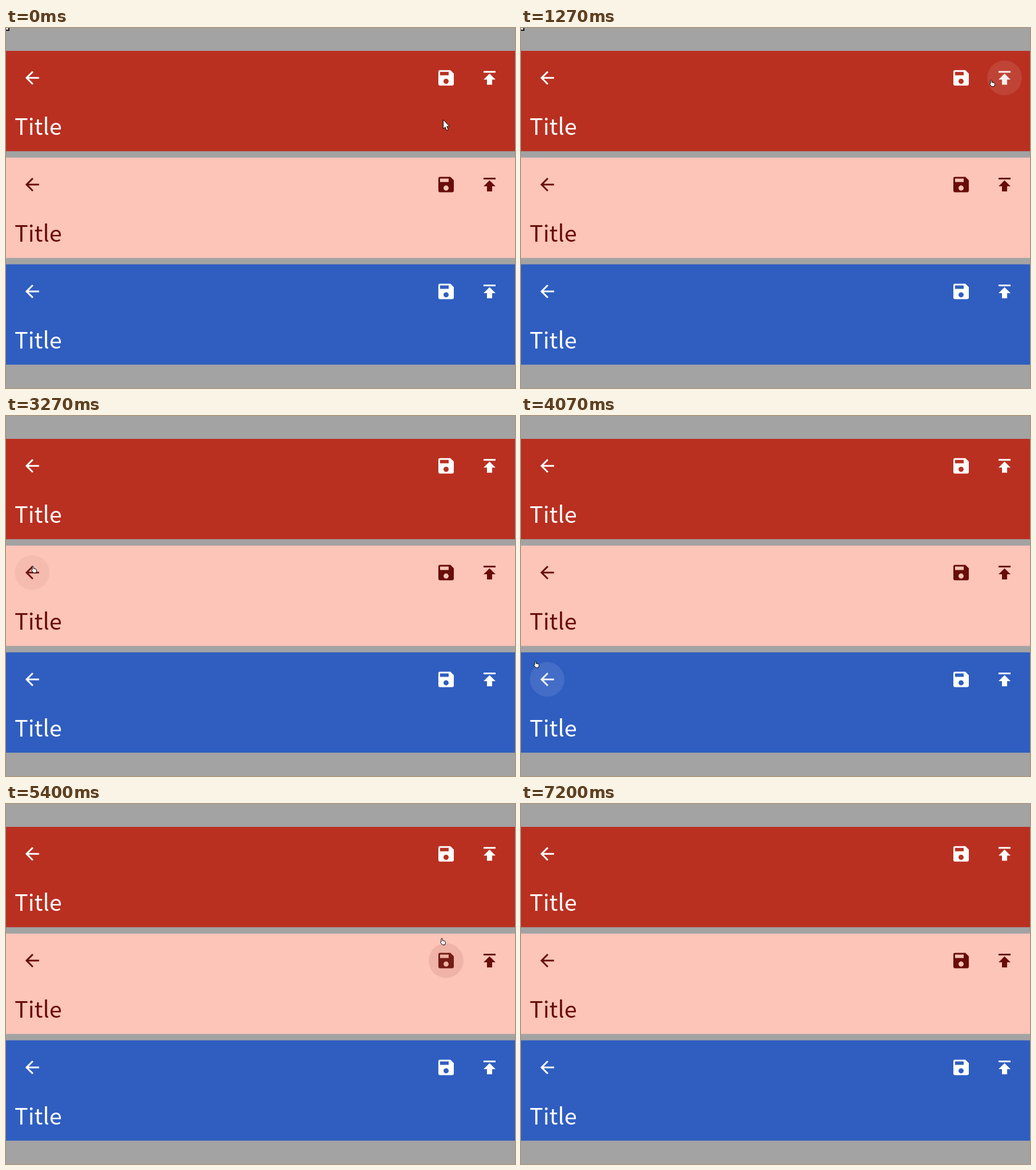
An HTML page that plays this animation: 890 by 630 pixels, repeating every 7940 ms.

```html
<!DOCTYPE html>
<html lang="en">
<head>
<meta charset="utf-8">
<title>App bars</title>
<style>
  html, body { margin: 0; width: 100%; height: 100%; overflow: hidden; background: #a3a3a4; }
  svg { display: block; }
  text { font: 39.5px "Noto Sans CJK JP", "Noto Sans CJK SC", "Noto Sans CJK", "Noto Sans", sans-serif; }
</style>
</head>
<body>
<svg id="stage" width="890" height="630" viewBox="0 0 890 630">
  <g id="bars"></g>
  <g id="corner">
    <path d="M0 0H6V5H0Z" fill="#111"/>
    <path d="M0 0H4V3H0Z" fill="#d4d4d4"/>
  </g>
  <g id="cursor" fill="#fff" stroke="#000" stroke-linejoin="round">
    <path id="arrow" d="M.5 .5V16.5L4 13.3L6.6 19.3L9.3 18.1L6.8 12.2H11.6Z"/>
    <path id="hand" d="M2 1.7Q3.1 0 4.2 1.7V5L8.3 6Q9.9 6.6 9.5 8.6L8.5 12.5H4L.8 8.5Q.4 6.8 2 7.2Z"/>
  </g>
</svg>
<script>
const LOOP = 7940, TICKS_PER_MS = 0.015;
const byId = id => document.getElementById(id);

function add(parent, tag, attrs, text = "") {
  const node = document.createElementNS("http://www.w3.org/2000/svg", tag);
  for (const name in attrs) node.setAttribute(name, attrs[name]);
  node.textContent = text;
  return parent.appendChild(node);
}

const icons = {
  back: { x: 45.8, d: "M20 11H7.83l5.59-5.59L12 4l-8 8 8 8 1.41-1.41L7.83 13H20v-2z" },
  save: { x: 769.5, d: "M17 3H5a2 2 0 0 0-2 2v14a2 2 0 0 0 2 2h14a2 2 0 0 0 2-2V7l-4-4z" +
    "M12 19a3 3 0 1 1 0-6 3 3 0 0 1 0 6zM15 9H5V5h10v4z" },
  upload: { x: 845.5, d: "M5 4v2h14V4H5zM5 14h4v6h6v-6h4l-7-7-7 7z" }
};
const themes = {
  red: { y: 40, back: "#b93021", ink: "#fff" },
  pink: { y: 226.8, back: "#fdc4b8", ink: "#680d08" },
  blue: { y: 413.6, back: "#2f5ec0", ink: "#fff" }
};

const buttons = {};
for (const [theme, { y, back, ink }] of Object.entries(themes)) {
  const bar = add(byId("bars"), "g", { transform: `translate(0 ${y})`, fill: ink });
  add(bar, "rect", { width: 890, height: 175.6, fill: back });
  add(bar, "text", { x: 15, y: 147.4 }, "Title");
  for (const [icon, { x, d }] of Object.entries(icons)) {
    const button = add(bar, "g", { transform: `translate(${x} 47.3)` });
    buttons[`${theme} ${icon}`] = {
      halo: add(button, "circle", { r: 30.3 }),
      glyph: add(button, "path", { d, "fill-rule": "evenodd", transform: "scale(1.5) translate(-12 -12)" })
    };
  }
}

// Button, first and last tick of its hover
const hovers = [
  ["red save", 3, 6], ["red upload", 5, 11], ["red save", 11, 14], ["red upload", 14, 22],
  ["red back", 31, 42], ["pink back", 49, 56], ["blue back", 58, 63],
  ["pink save", 79, 86], ["blue save", 87, 104]
];

// Each stroke lists tick, x, y and shape; the pointer rests between strokes
const strokes = [
  [[0, 764, 160], [1, 766, 193], [3, 772, 100, "hand"], [5, 800, 90, "hand"], [7, 842, 90, "hand"]],
  [[10, 830, 92, "hand"], [12, 774, 92, "hand"], [14, 790, 108], [16, 840, 95, "hand"]],
  [[19, 819, 90, "hand"], [20, 819, 90, "hand"], [22, 740, 110], [26, 214, 185], [27, 0, 0, "none"]],
  [[31, 42, 75, "hand"], [33, 29, 44.5, "hand"], [34, 29, 44.5, "hand"], [38, 45, 105, "hand"],
    [42, 44, 90, "hand"], [44, 42, 241]],
  [[49, 44, 262, "hand"], [54, 45, 310], [58, 45, 450, "hand"], [60, 40, 507], [61, 21.5, 428, "hand"], [62, 24, 415]],
  [[64, 100, 380], [72, 877, 254], [75, 838, 267], [77, 758, 234, "hand"]],
  [[79, 764, 250, "hand"], [81, 758.5, 234, "hand"], [84, 768, 280, "hand"], [86, 770, 360],
    [87, 770, 440, "hand"], [89, 780, 525], [90, 799, 463]],
  [[93, 812, 410], [97, 840, 238]],
  [[100, 830, 280], [102, 768, 433, "hand"]],
  [[105, 700, 510], [107, 253, 606], [108, 0, 0, "none"]]
];

function pointerAt(tick) {
  const stroke = strokes.filter(s => s[0][0] <= tick).pop();
  const i = stroke.findLastIndex(key => key[0] <= tick);
  const [start, x, y, shape = "arrow"] = stroke[i];
  const next = stroke[i + 1];
  const part = next ? (tick - start) / (next[0] - start) : 0;
  return { x: x + part * ((next?.[1] ?? x) - x), y: y + part * ((next?.[2] ?? y) - y), shape };
}

const clamp = v => Math.max(0, Math.min(1, v));

function render(time) {
  const tick = Math.floor((time % LOOP + 3.5) * TICKS_PER_MS);
  for (const name in buttons) {
    const level = Math.max(0, ...hovers.filter(h => h[0] === name)
      .map(([, on, off]) => clamp(Math.min((tick - on + 1) / 2, (off + 2 - tick) / 2))));
    buttons[name].halo.setAttribute("opacity", 0.095 * level);
    buttons[name].glyph.setAttribute("opacity", 1 - 0.09 * level);
  }
  const { x, y, shape } = pointerAt(tick);
  byId("cursor").setAttribute("transform", `translate(${Math.round(x)} ${Math.round(y)})`);
  for (const id of ["arrow", "hand"]) byId(id).style.display = id === shape ? "" : "none";
  byId("corner").style.display = tick < 47 ? "" : "none";
}

const begin = performance.now();
function loop() {
  render(performance.now() - begin);
  requestAnimationFrame(loop);
}
loop();
</script>
</body>
</html>
```
